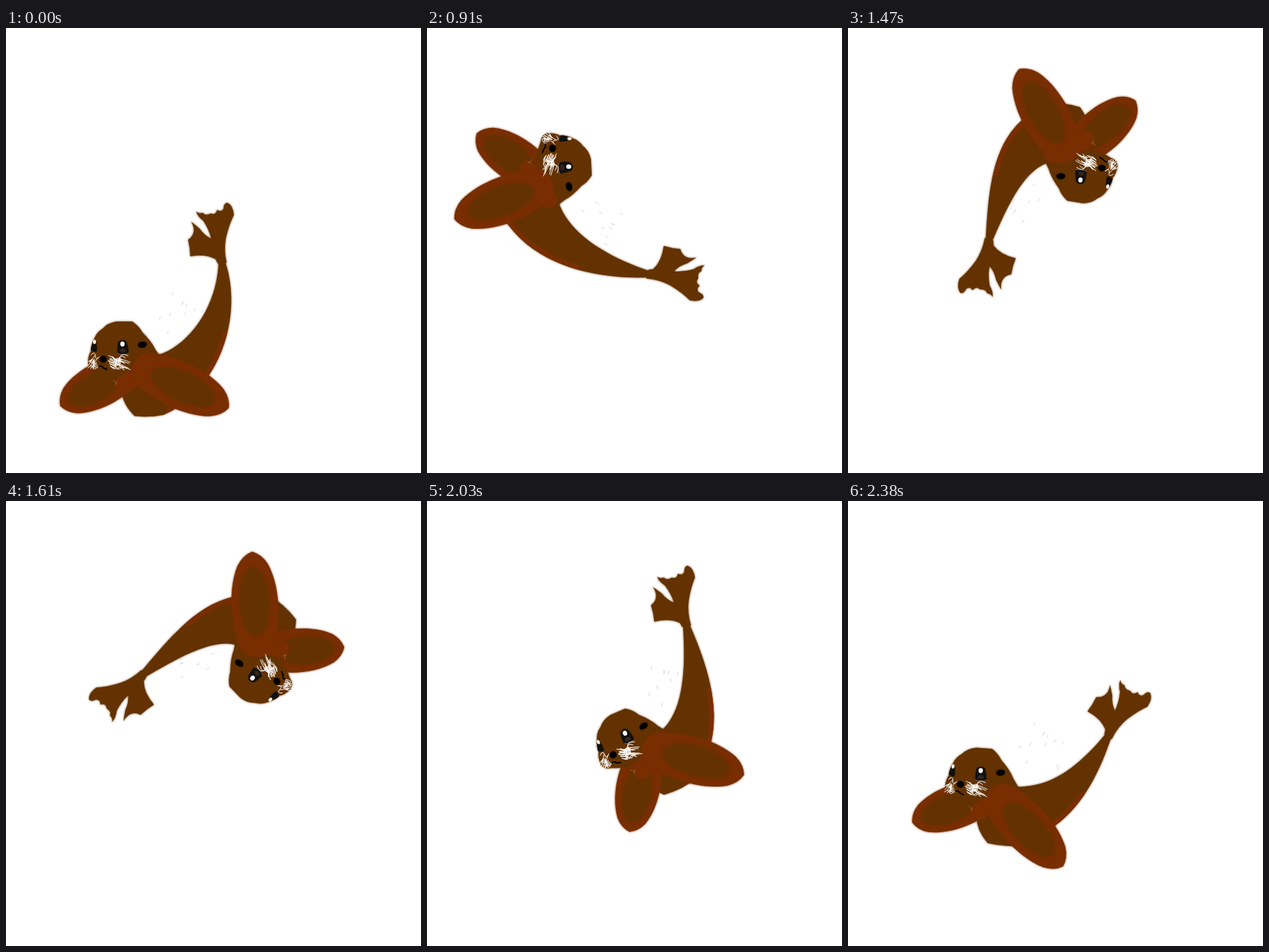
An HTML page with a canvas that plays this animation: 572 by 614 pixels, repeating every 2.45 s.

```html
<!DOCTYPE html>
<html lang="en">
<head>
<meta charset="utf-8">
<title>Seal</title>
<style>
  html, body { margin: 0; width: 100%; height: 100%; overflow: hidden; background: #fff; }
  canvas { display: block; width: 572px; height: 614px; }
</style>
</head>
<body>
<canvas id="stage" width="572" height="614"></canvas>
<script>
const ctx = document.getElementById('stage').getContext('2d');
const LOOP = 2450, HOLD = 560, STEP = 70;
const BROWN = '#633200', RUST = '#782e00';
const rad = deg => deg * Math.PI / 180;
const noise = n => { const x = Math.sin(n * 127.1) * 43758.5; return x - Math.floor(x); };

// A pose: turn, nose x, y on the stage; then relative to the head:
// tail joint x, y, tail turn, left and right flipper angle.
const rest = [0, 134, 458, 163, -138, 0, 152, 25];
const keys = [
  { step: 0, v: [71, 134, 267, 172, -137, 12, 128, 70] },
  { step: 5, v: [87, 172, 166, 181, -127, 21, 127, 72] },
  { step: 10, v: [139, 275, 121, 152, -123, 16, 129, 69] },
  { step: 15, v: [226, 374, 248, 135, -130, 14, 130, 41] },
  { step: 21, v: [337, 257, 351, 163, -129, 19, 124, 39] },
  { step: 26, v: [364, 155, 392, 200, -85, 35, 156, 43] }
];

function slope(i, n) {
  const a = keys[Math.max(i - 1, 0)], b = keys[Math.min(i + 1, keys.length - 1)];
  return (b.v[n] - a.v[n]) / (b.step - a.step);
}

// Cubic spline through the key poses.
function poseAt(step) {
  if (step < 0) return rest;
  let i = 0;
  while (i < keys.length - 2 && step >= keys[i + 1].step) i++;
  const a = keys[i], b = keys[i + 1], d = b.step - a.step;
  const u = (step - a.step) / d, u2 = u * u, u3 = u2 * u;
  return a.v.map((p, n) =>
    p * (2 * u3 - 3 * u2 + 1) + b.v[n] * (3 * u2 - 2 * u3) +
    d * (slope(i, n) * (u3 - 2 * u2 + u) + slope(i + 1, n) * (u3 - u2)));
}

const tail = new Path2D('M7 4Q3 -14 6 -30Q10 -48 17 -62Q16 -75 8 -79Q3 -78 3 -71Q0 -65 -6 -69' +
  'Q-8 -61 -15 -64Q-22 -60 -26 -65Q-31 -63 -35 -67Q-33 -60 -25 -54Q-17 -42 -14 -29' +
  'Q-24 -34 -30 -43Q-36 -48 -42 -53Q-36 -44 -39 -36Q-41 -31 -46 -28Q-43 -16 -43 -5Q-22 -9 -8 -1L-5 5Z');
const head = new Path2D('M-1 -43Q6 -51 18 -53L40 -53Q49 -47 54 -38Q67 -25 72 -14L85 5' +
  'Q74 22 50 20L16 22Q0 20 -9 15Q-20 13 -21 5Q-21 -6 -17 -12Q-17 -22 -12 -30Q-9 -38 -1 -43Z');
const eye = new Path2D('M21 -25Q28 -30 32 -25Q35 -16 35 -9Q27 -7 20 -9Q19 -18 21 -25Z');
const sideEye = new Path2D('M-11 -27Q-8 -20 -9 -12Q-13 -10 -17 -14Q-16 -22 -11 -27Z');

function fill(path, color, blur = 0) {
  ctx.shadowColor = color;
  ctx.shadowBlur = blur;
  ctx.fillStyle = color;
  ctx.fill(path);
  ctx.shadowBlur = 0;
}

function spot(x, y, rx, ry, color, blur = 0, turn = 0) {
  const p = new Path2D();
  p.ellipse(x, y, rx, ry, turn, 0, 7);
  fill(p, color, blur);
}

function line(path, color, width) {
  ctx.strokeStyle = color;
  ctx.lineWidth = width;
  ctx.stroke(new Path2D(path));
}

const polyline = pts => 'M' + pts.map(p => p.join(' ')).join('L');

// The body follows a curved spine from chest to tail and narrows on the way.
function drawBody(jx, jy, tailTurn) {
  const axis = rad(tailTurn - 100);
  const spine = [[41, 42], [126, 37], [jx - 80 * Math.cos(axis), jy - 80 * Math.sin(axis)], [jx, jy]];
  const inner = [], outer = [];
  for (let t = 0; t < 1.01; t += 0.04) {
    const m = 1 - t;
    const [x, y] = [0, 1].map(k => m * m * m * spine[0][k] + 3 * m * m * t * spine[1][k] +
      3 * m * t * t * spine[2][k] + t * t * t * spine[3][k]);
    const [dx, dy] = [0, 1].map(k => m * m * (spine[1][k] - spine[0][k]) +
      2 * m * t * (spine[2][k] - spine[1][k]) + t * t * (spine[3][k] - spine[2][k]));
    const w = (4 + 43 * m) * Math.min(1, 0.75 + 2 * t) / Math.hypot(dx, dy);
    inner.push([x + dy * w, y - dx * w]);
    outer.push([x - dy * w, y + dx * w]);
  }
  const [x0, y0] = outer[0], [x1, y1] = inner[0];
  const path = new Path2D(polyline([...inner, ...outer.slice().reverse()]) + `Q10 44 ${x1} ${y1}Z`);
  fill(path, BROWN, 3);
  ctx.save();
  ctx.clip(path);
  line(polyline(outer.slice(4, 16)), RUST, 14);
  ctx.restore();
}

function drawTail(x, y, turn) {
  ctx.save();
  ctx.translate(x, y);
  ctx.rotate(rad(turn));
  fill(tail, BROWN, 3);
  ctx.restore();
}

function flipper(x, y, turn, len, w, mid) {
  ctx.save();
  ctx.translate(x, y);
  ctx.rotate(rad(turn));
  const p = new Path2D();
  p.moveTo(len, 0);
  p.quadraticCurveTo(0.97 * len, 0.4 * w, 0.87 * len, 0.65 * w);
  p.bezierCurveTo(0.6 * len, 1.2 * w, 0.2 * len, 1.05 * w, 0, 0.6 * w);
  p.quadraticCurveTo(-0.1 * len, 0, 0, -0.6 * w);
  p.bezierCurveTo(0.2 * len, -1.05 * w, 0.6 * len, -1.2 * w, 0.87 * len, -0.65 * w);
  p.quadraticCurveTo(0.97 * len, -0.4 * w, len, 0);
  fill(p, RUST, 3);
  spot(mid * len, 0, 0.34 * len, 0.62 * w, BROWN, 4);
  ctx.restore();
}

function whiskers(count, side, reach) {
  for (let i = 0; i < count; i++) {
    const x = side * (5 + 9 * noise(i + side)), y = -6 + 17 * i / count;
    const ex = side * reach * (0.6 + 0.4 * noise(i + 20)), ey = -7 + 23 * noise(i + 40 + side);
    const m = (x + ex) / 2;
    line(`M${x} ${y}Q${m} ${y + 6} ${m} ${(y + ey) / 2}T${ex} ${ey}`, '#fff', 0.9);
  }
}

function drawFace() {
  fill(sideEye, '#111', 1);
  spot(-12, -25, 2, 3, '#fff');
  fill(eye, '#111', 1);
  line('M20 -9Q27 -6 35 -9', '#8a6a55', 0.8);
  spot(27, -13, 4, 2.5, '#34251f', 2);
  spot(26.5, -22, 3, 3.5, '#fff');
  spot(54, -21, 6, 4, '#000', 2, -0.2);
  spot(0, -1, 5, 4.5, '#000', 1);
  line('M-8 9Q-2 7 0 11L5 13', '#080300', 2);
  whiskers(11, -1, 23);
  whiskers(18, 1, 38);
}

function drawSpecks() {
  for (let i = 0; i < 12; i++) {
    const x = 72 + 65 * noise(i + 60), y = -90 + 60 * noise(i + 80);
    line(`M${x} ${y}l2 -4`, '#ccc', 0.7);
  }
}

function draw(step) {
  const [turn, x, y, jx, jy, tailTurn, left, right] = poseAt(step);
  ctx.setTransform(1, 0, 0, 1, 0, 0);
  ctx.fillStyle = '#fff';
  ctx.fillRect(0, 0, 572, 614);
  ctx.translate(x, y);
  ctx.rotate(rad(turn));
  ctx.lineCap = 'round';

  drawSpecks();
  drawBody(jx, jy, tailTurn);
  drawTail(jx, jy, tailTurn);
  flipper(45, 8, left, 118, 30, 0.54);
  fill(head, BROWN, 3);
  line('M28 34L70 8', RUST, 24);
  flipper(48, 8, right, 138, 32, 0.5);
  line('M14 28L18 32M17 34L19 30', '#a87346', 0.7);
  drawFace();
}

function tick() {
  draw(Math.floor((performance.now() % LOOP - HOLD) / STEP));
  requestAnimationFrame(tick);
}
tick();
</script>
</body>
</html>
```
